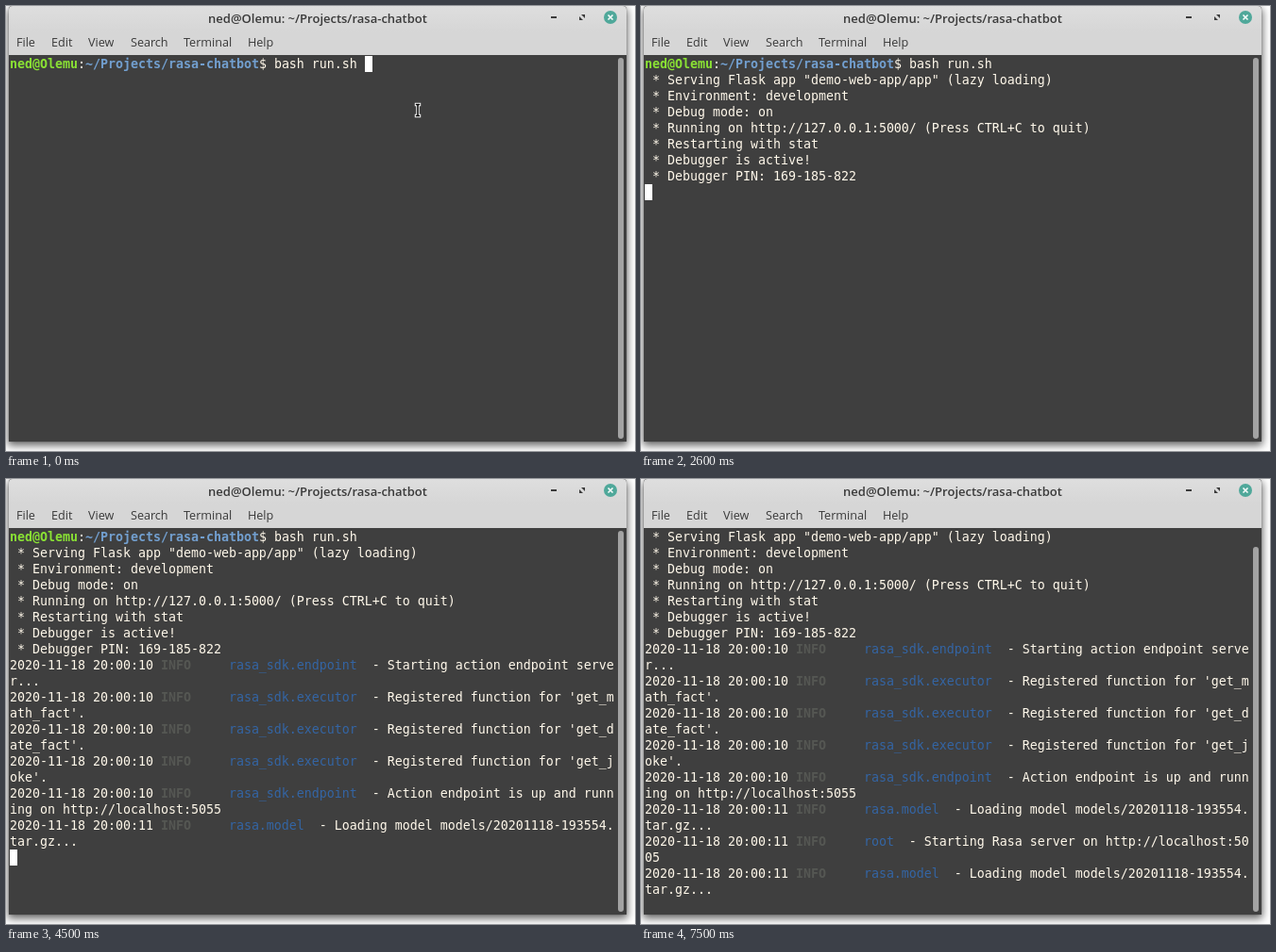
Write an HTML page that moves like this. It is 666 px wide and 472 px high and loops after 8000 ms.

```html
<!DOCTYPE html>
<html lang="en">
<head>
<meta charset="utf-8">
<title>Terminal</title>
<style>
  html, body { margin: 0; width: 100%; height: 100%; overflow: hidden; background: #fff; }
  .stage { position: relative; width: 666px; height: 472px; overflow: hidden; }
  .win {
    position: absolute; left: 3px; top: 0; width: 654px; height: 462px;
    background: #3f3f3f; border-radius: 4px 4px 0 0;
    box-shadow: 0 0 1px rgba(0,0,0,.6), 0 3px 9px 1px rgba(0,0,0,.62);
  }
  .bar {
    position: absolute; left: 0; top: 0; width: 654px; height: 52px;
    background: linear-gradient(#dedede, #d6d6d6 27px); border-radius: 4px 4px 0 0;
  }
  svg { position: absolute; left: 0; top: 0; }
  .ui { font: 12.6px "Open Sans", "Noto Sans", sans-serif; fill: #3a3a3a; }
  .ui .title { font-size: 13px; font-weight: 600; text-anchor: middle; }
  .term {
    position: absolute; left: 3px; top: 53px; width: 654px; height: 408px; overflow: hidden;
    font: 13.29px/17px "DejaVu Sans Mono", monospace; color: #fff8ea;
  }
  .text {
    position: absolute; left: 1px; top: 0; width: 643px;
    white-space: break-spaces; line-break: anywhere;
  }
  .green { color: #8ae234; font-weight: bold; }
  .path { color: #729fcf; font-weight: bold; }
  .dim { color: #555753; font-weight: bold; }
  .blue { color: #3465a4; }
  .cursor { position: absolute; width: 8px; height: 17px; background: #fff; }
  .scroll { position: absolute; left: 648px; width: 6px; border-radius: 3px; background: #a3a3a3; }
</style>
</head>
<body>
<div class="stage">
  <div class="win"><div class="bar"></div></div>
  <div class="term"><div class="text" id="text"></div><div class="cursor" id="cursor"></div></div>
  <div class="scroll" id="scroll"></div>
  <svg width="666" height="472">
    <g class="ui">
      <text class="title" x="330" y="18">ned@Olemu: ~/Projects/rasa-chatbot</text>
      <text x="11" y="43">File</text>
      <text x="48" y="43">Edit</text>
      <text x="87" y="43">View</text>
      <text x="132" y="43">Search</text>
      <text x="188" y="43">Terminal</text>
      <text x="256" y="43">Help</text>
    </g>
    <path d="M577 11h6v2h-6zM609 9h4v4zM607 11v4h4z" fill="#3a3a3a"/>
    <circle cx="640" cy="12" r="7" fill="#4fa89a"/>
    <path d="M637.5 9.5l5 5m0-5l-5 5" stroke="#fff" stroke-width="1.5"/>
    <g id="mouse" fill="none" stroke-linecap="square">
      <path d="M434.5 104.5h3M436 104.5v12M434.5 116.5h3" stroke="#fff" stroke-width="3.4"/>
      <path d="M434.5 104.5h3M436 104.5v12M434.5 116.5h3" stroke="#000" stroke-width="1.5"/>
    </g>
  </svg>
</div>
<script>
const LOOP = 8000, ROW = 17, COL = 8;
const $ = id => document.getElementById(id);
const log = (sec, name, msg) => [
  `2020-11-18 20:00:${sec} `, ['dim', 'INFO'], '     ', ['blue', name], `  - ${msg}`
];
const action = fn => log(10, 'rasa_sdk.executor', `Registered function for '${fn}'.`);
const model = log(11, 'rasa.model', 'Loading model models/20201118-193554.tar.gz...');

const entries = [
  [['green', 'ned@Olemu'], ':', ['path', '~/Projects/rasa-chatbot'], '$ bash run.sh '],
  [' * Serving Flask app "demo-web-app/app" (lazy loading)'],
  [' * Environment: development'],
  [' * Debug mode: on'],
  [' * Running on http://127.0.0.1:5000/ (Press CTRL+C to quit)'],
  [' * Restarting with stat'],
  [' * Debugger is active!'],
  [' * Debugger PIN: 169-185-822'],
  log(10, 'rasa_sdk.endpoint', 'Starting action endpoint server...'),
  action('get_math_fact'),
  action('get_date_fact'),
  action('get_joke'),
  log(10, 'rasa_sdk.endpoint', 'Action endpoint is up and running on http://localhost:5055'),
  model,
  log(11, 'root', 'Starting Rasa server on http://localhost:5005'),
  model
];

// output: time, entries shown, cursor row, cursor column, rows scrolled
const output = [
  [0, 1, 0, 47, 0],
  [2100, 1, 1, 0, 0],
  [2300, 6, 6, 0, 0],
  [2600, 8, 8, 0, 0],
  [4200, 13, 18, 0, 0],
  [4300, 14, 20, 0, 0],
  [4700, 16, 23, 0, 1]
];
// cursor visibility flips at each time, starting visible
const blinks = [300, 900, 1500, 2000, 2700, 3300, 3900, 4500, 5100, 5700, 6300, 6900, 7500];
const MOUSE_HIDE = 2000;

const lines = entries.map(parts => {
  const div = document.createElement('div');
  for (const part of parts) {
    const [cls, str] = Array.isArray(part) ? part : ['', part];
    const span = document.createElement('span');
    span.className = cls;
    span.textContent = str;
    div.append(span);
  }
  $('text').append(div);
  return div;
});

function draw(t) {
  const [, count, row, col, shift] = output.filter(s => s[0] <= t).pop();
  const on = blinks.filter(b => b <= t).length % 2 === 0;
  lines.forEach((div, i) => { div.style.display = i < count ? '' : 'none'; });
  $('text').style.top = -shift * ROW + 'px';
  $('cursor').style.cssText =
    `left:${1 + col * COL}px;top:${row * ROW}px;visibility:${on ? 'visible' : 'hidden'}`;
  const top = 55 + shift * ROW;
  $('scroll').style.cssText = `top:${top}px;height:${459 - top}px`;
  $('mouse').style.visibility = t < MOUSE_HIDE ? 'visible' : 'hidden';
}

const start = performance.now();
function tick() {
  draw((performance.now() - start) % LOOP);
  requestAnimationFrame(tick);
}
tick();
</script>
</body>
</html>
```
